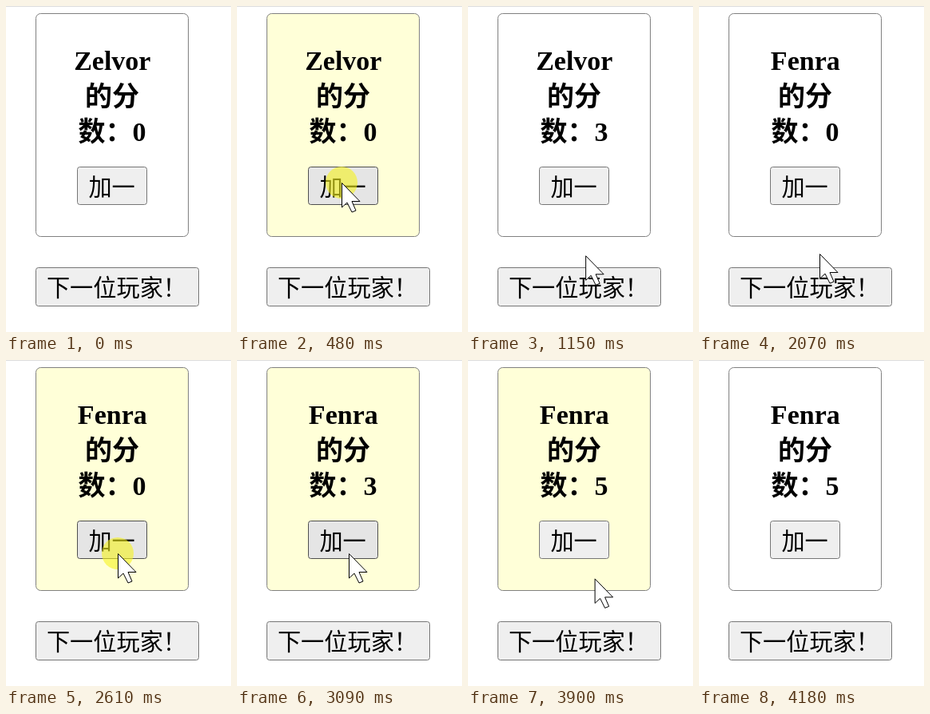
Write an HTML page that moves like this. It is 282x408 px and loops after 4640 ms.

```html
<!DOCTYPE html>
<html lang="zh-CN">
<head>
<meta charset="utf-8">
<style>
  html, body { margin: 0; width: 100%; height: 100%; overflow: hidden; background: #fff; }
  svg { display: block; }
  text { text-anchor: middle; font: 350 29.2px "Noto Sans CJK SC", "Noto Sans CJK", sans-serif; }
  .title text { font: bold 34px "Liberation Serif", "Noto Sans CJK SC", "Noto Sans CJK", serif; }
  .button rect { fill: #efefef; stroke: #767676; }
  .button.hover rect { fill: #e5e5e5; stroke: #4f4f4f; }
  #card { fill: #fff; stroke: #808080; }
  #card.hover { fill: #ffffd8; }
</style>
</head>
<body>
<svg width="282" height="408" viewBox="0 0 282 408">
  <path d="M0 .5H282" stroke="#dcdcdc"/>
  <rect id="card" x="37.5" y="9.5" width="191" height="279" rx="6"/>
  <g class="title">
    <text id="player" x="133.3" y="80"></text>
    <text x="133" y="124.5">的分</text>
    <text id="score" x="133" y="168.7"></text>
  </g>
  <g id="add" class="button">
    <rect x="89.5" y="201.5" width="87" height="47" rx="3"/>
    <text x="132.6" y="237">加一</text>
  </g>
  <g id="next" class="button">
    <rect x="37.5" y="327.5" width="204" height="48" rx="3"/>
    <text x="138.5" y="363">下一位玩家！</text>
  </g>
  <g id="pointer">
    <circle id="glow" r="20" fill="#f7f41e" opacity=".6"/>
    <path d="M.5 .5V31L7 25L13 37L18 35L13 23.5H23Z" fill="#fff" stroke="#000"/>
  </g>
</svg>
<script>
const LOOP = 4640, TICK = 67.25;

const slowDown = k => 1 - (1 - k) ** 1.5;
const speedUp = k => k ** 1.6;

// Pointer moves between resting places, timed in ticks.
const outside = [248, 424];
const moves = [
  { from: 0, to: 5, end: [131, 221], ease: slowDown },
  { from: 13, to: 19, end: [151, 334], ease: slowDown },
  { from: 30, to: 31, end: [151, 310], ease: slowDown },
  { from: 31, to: 33, end: [142, 257], ease: slowDown },
  { from: 36, to: 38, end: [140, 242], ease: slowDown },
  { from: 56, to: 62, end: outside, ease: speedUp }
];

// Each click is lit for one tick and takes effect on the following one.
const clickRun = (first, gap, count) =>
  Array.from({ length: count }, (_, i) => Math.floor(first + gap * i));
const firstClicks = clickRun(7, 2.5, 3);
const nextClick = 23;
const secondClicks = clickRun(39, 3, 5);
const clicks = [...firstClicks, nextClick, ...secondClicks];

const $ = id => document.getElementById(id);

function pointerAt(tick) {
  return moves.reduce((pos, { from, to, end, ease }) => {
    const k = ease(Math.min(1, Math.max(0, (tick - from) / (to - from))));
    return pos.map((p, i) => p + (end[i] - p) * k);
  }, outside);
}

function setHover(shape, target, x, y) {
  const b = shape.getBBox();
  const inside = x > b.x && x < b.x + b.width && y > b.y && y < b.y + b.height;
  target.classList.toggle("hover", inside);
}

function draw(now) {
  // The pointer and the page refresh in discrete ticks.
  const tick = Math.floor(now % LOOP / TICK + 0.25);
  const [x, y] = pointerAt(tick);
  const second = tick > nextClick;
  const score = (second ? secondClicks : firstClicks).filter(c => tick > c).length;

  $("player").textContent = second ? "Fenra" : "Zelvor";
  $("score").textContent = "数：" + score;
  setHover($("card"), $("card"), x, y);
  for (const id of ["add", "next"]) setHover($(id).firstElementChild, $(id), x, y);
  $("pointer").setAttribute("transform", `translate(${x} ${y})`);
  $("glow").style.display = clicks.includes(tick) ? "" : "none";
}

const start = performance.now();
function loop() {
  draw(performance.now() - start);
  requestAnimationFrame(loop);
}
loop();
</script>
</body>
</html>
```
